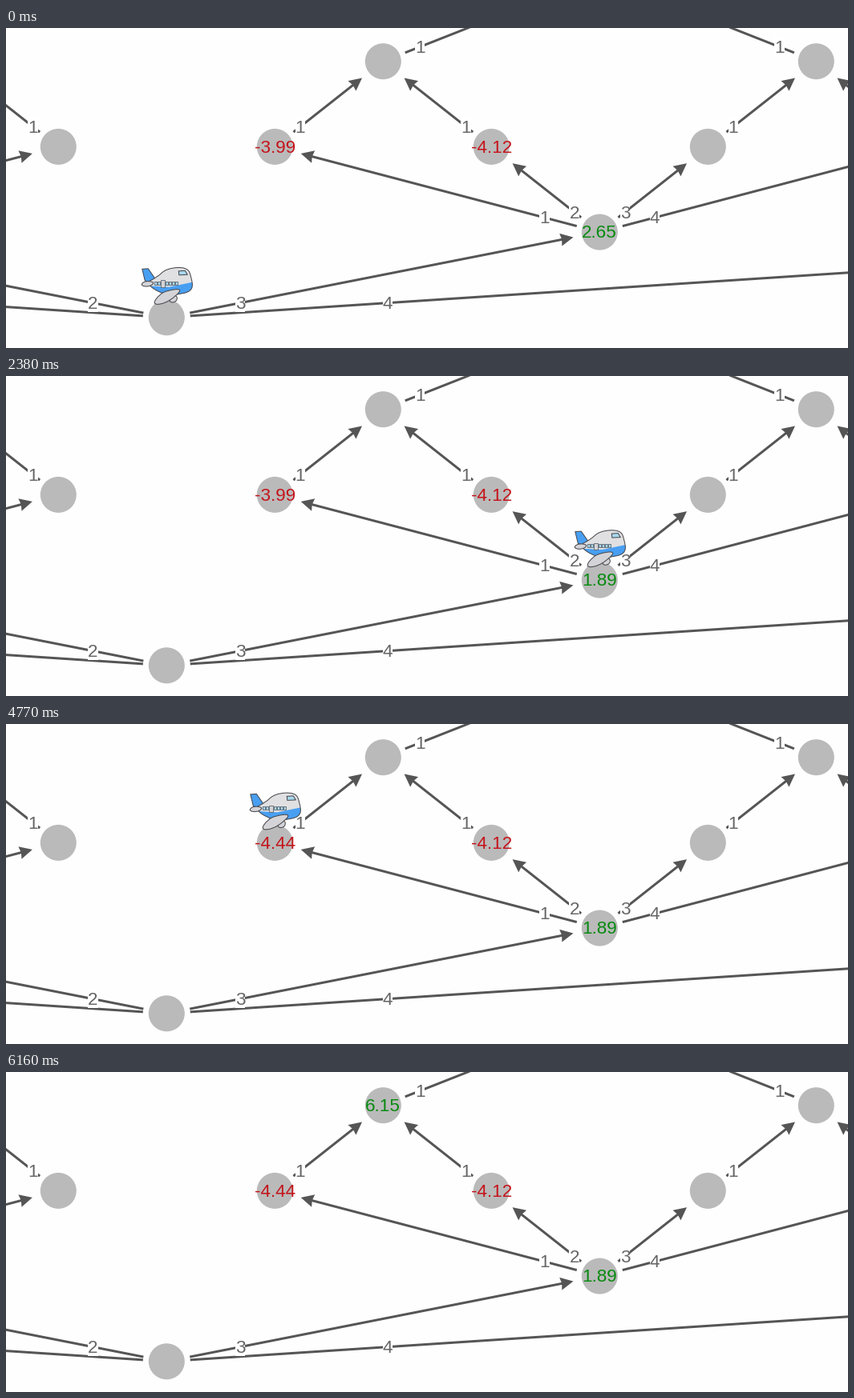
Recreate the animation shown at these times as a matplotlib script. Size 1050 by 400 pixels, loop 8330 ms.

```python
import math

import matplotlib.pyplot as plt
from matplotlib.animation import FuncAnimation
from matplotlib.collections import LineCollection, PolyCollection
from matplotlib.patches import Circle, PathPatch, Rectangle
from matplotlib.path import Path
from matplotlib.transforms import Affine2D

W, H, DPI = 1050, 400, 100
LOOP, INTERVAL = 8330, 10
PX = 72 / DPI
GREY, EDGE, LABEL = "#bababa", "#555555", "#666666"
RED, GREEN = "#c4141b", "#078a10"
OUTLINE, BLUE, GLASS, METAL = "#44444a", "#489ff2", "#a9d8ee", "#d4d4d8"
FONT = dict(family="Liberation Sans", size=22.5 * PX, ha="center", va="baseline")

fig = plt.figure(figsize=(W / DPI, H / DPI), dpi=DPI, facecolor="#fefefe")
ax = fig.add_axes([0, 0, 1, 1])
ax.set_xlim(0, W)
ax.set_ylim(H, 0)
ax.axis("off")

# Half the distance between neighbouring leaves, and the distance between rows
GAP, ROW = 135, 106.7


def node(column, level):
    """A grid point, counted from the root."""
    return 200.3 + column * GAP, 361.8 - level * ROW


ROOT, HUB, LEFT, INNER = node(0, 0), node(4, 1), node(1, 2), node(3, 2)
UPPER, TOP = node(2, 3), node(4, 4)


def build_graph():
    """Four branches at the root and at each hub, then pairs that merge again."""
    nodes, edges = {ROOT}, []
    for i in range(4):
        hub_col = 8 * i - 12
        hub = node(hub_col, 1)
        edges.append((ROOT, hub, i + 1))
        for j in range(4):
            col = hub_col + 2 * j - 3
            merge_col = hub_col - 2 if j < 2 else hub_col + 2
            leaf, merge = node(col, 2), node(merge_col, 3)
            edges += [(hub, leaf, j + 1), (leaf, merge, 1)]
            if j % 2:
                edges.append((merge, node(hub_col, 4), 1))
            nodes |= {hub, leaf, merge}
    return nodes, edges


def text(x, y, s, color, z):
    return ax.text(x, y + 7.4, s, color=color, zorder=z, clip_on=True, **FONT)


def draw_graph():
    nodes, edges = build_graph()
    lines, heads = [], []
    for (x0, y0), (x1, y1), name in edges:
        length = math.hypot(x1 - x0, y1 - y0)
        ux, uy = (x1 - x0) / length, (y1 - y0) / length

        def at(along, across=0):
            return x0 + ux * along - uy * across, y0 + uy * along + ux * across

        tip = length - 33.5
        lines.append([at(29.5), at(tip - 12)])
        heads.append([at(tip), at(tip - 16, 8), at(tip - 14.5), at(tip - 16, -8)])
        lx, ly = at(max(0.17 * length, 40.3))
        if 0 < lx < W and 0 < ly < H:
            ax.add_patch(Rectangle((lx - 6.2, ly - 12.5), 12.4, 24,
                                   fc="white", lw=0, zorder=2))
            text(lx, ly, str(name), LABEL, 3)
    ax.add_collection(LineCollection(lines, colors=EDGE, linewidths=3 * PX, zorder=1))
    ax.add_collection(PolyCollection(heads, facecolors=EDGE, linewidths=0, zorder=1))
    for center in nodes:
        if -30 < center[0] < W + 30:
            ax.add_patch(Circle(center, 22.5, fc=GREY, lw=0, zorder=4))


draw_graph()
text(*INNER, "-4.12", RED, 5)

# Node, text before and after, colour, time of change
VALUES = [
    (HUB, "2.65", "1.89", GREEN, 2380),
    (LEFT, "-3.99", "-4.44", RED, 4180),
    (UPPER, "", "6.15", GREEN, 5270),
]
value_texts = [text(*spot, old, color, 5) for spot, old, _, color, _ in VALUES]

# The plane is drawn in its own 64 x 45 box
place = Affine2D()
plane = []


def part(path, fill, line=OUTLINE, width=1.0):
    shape = PathPatch(path, fc=fill, ec=line, lw=width * PX, joinstyle="round",
                      zorder=8 + len(plane) * 0.01)
    shape.set_transform(place + ax.transData)
    plane.append(ax.add_patch(shape))
    return shape


def poly(*points):
    return Path(points + points[:1], closed=True)


def smooth(*points):
    """A closed soft curve that follows a few control points."""
    def middle(a, b):
        return (a[0] + b[0]) / 2, (a[1] + b[1]) / 2

    verts, codes = [middle(points[-1], points[0])], [Path.MOVETO]
    for a, b in zip(points, points[1:] + points[:1]):
        verts += [a, middle(a, b)]
        codes += [Path.CURVE3] * 2
    return Path(verts, codes)


def box(x, y, w, h):
    return poly((x, y), (x + w, y), (x + w, y + h), (x, y + h))


def draw_plane():
    part(poly((1.5, 1.5), (9, 1), (18, 14), (12, 19), (5, 16)), BLUE)
    part(smooth((34, 34), (45, 34), (45, 42), (36, 44)), METAL)
    hull = smooth((5, 19), (20, 12), (32, 0.5), (58, -1),
                  (63, 12), (65, 27), (52, 33), (28, 34))
    body = part(hull, "#e0e0e2", "none")
    belly = part(poly((0, 22), (35, 24), (64, 18), (64, 45), (0, 45)), BLUE, "none")
    belly.set_clip_path(body)
    part(hull, "none")
    part(smooth((-1, 22), (5, 16), (18, 18), (10, 24)), METAL)
    for x in (17, 21, 31, 35, 39, 43):
        part(box(x, 17, 2.6, 4), GLASS, "#55606a", 0.8)
    part(box(25, 15.5, 5, 8.5), METAL, "#55606a", 0.8)
    part(poly((47, 4), (55, 3.5), (58, 8.5), (47.5, 9)), GLASS)
    part(smooth((14, 46), (23, 33), (34, 28), (51, 26), (44, 35), (29, 45)), METAL)


draw_plane()

# Departure, arrival, time already flown at departure, from, to
MOVES = [
    (1910, 2380, 52, ROOT, HUB),
    (3690, 4180, 16, HUB, LEFT),
    (4770, 5270, -20, LEFT, UPPER),
    (5930, 6430, 0, UPPER, TOP),
]
FLIGHT, TICK = 550, 52


def ease(t):
    return 0.5 - 0.5 * math.cos(math.pi * min(max(t, 0), 1))


def plane_position(ms):
    x, y = ROOT
    for start, end, lead, (x0, y0), (x1, y1) in MOVES:
        if ms < start:
            break
        step = min((ms - start) // TICK, 8)
        p = 1 if ms >= end else ease((step * TICK + lead) / FLIGHT)
        x, y = x0 + (x1 - x0) * p, y0 + (y1 - y0) * p
    return x, y


def update(i):
    ms = i * INTERVAL
    x, y = plane_position(ms)
    place.clear().translate(x - 32, y - 62)
    for artist, (_, old, new, _, when) in zip(value_texts, VALUES):
        artist.set_text(new if ms >= when else old)
    return plane + value_texts


anim = FuncAnimation(fig, update, frames=LOOP // INTERVAL, interval=INTERVAL,
                     repeat=True, repeat_delay=0, blit=False)
plt.show()
```
